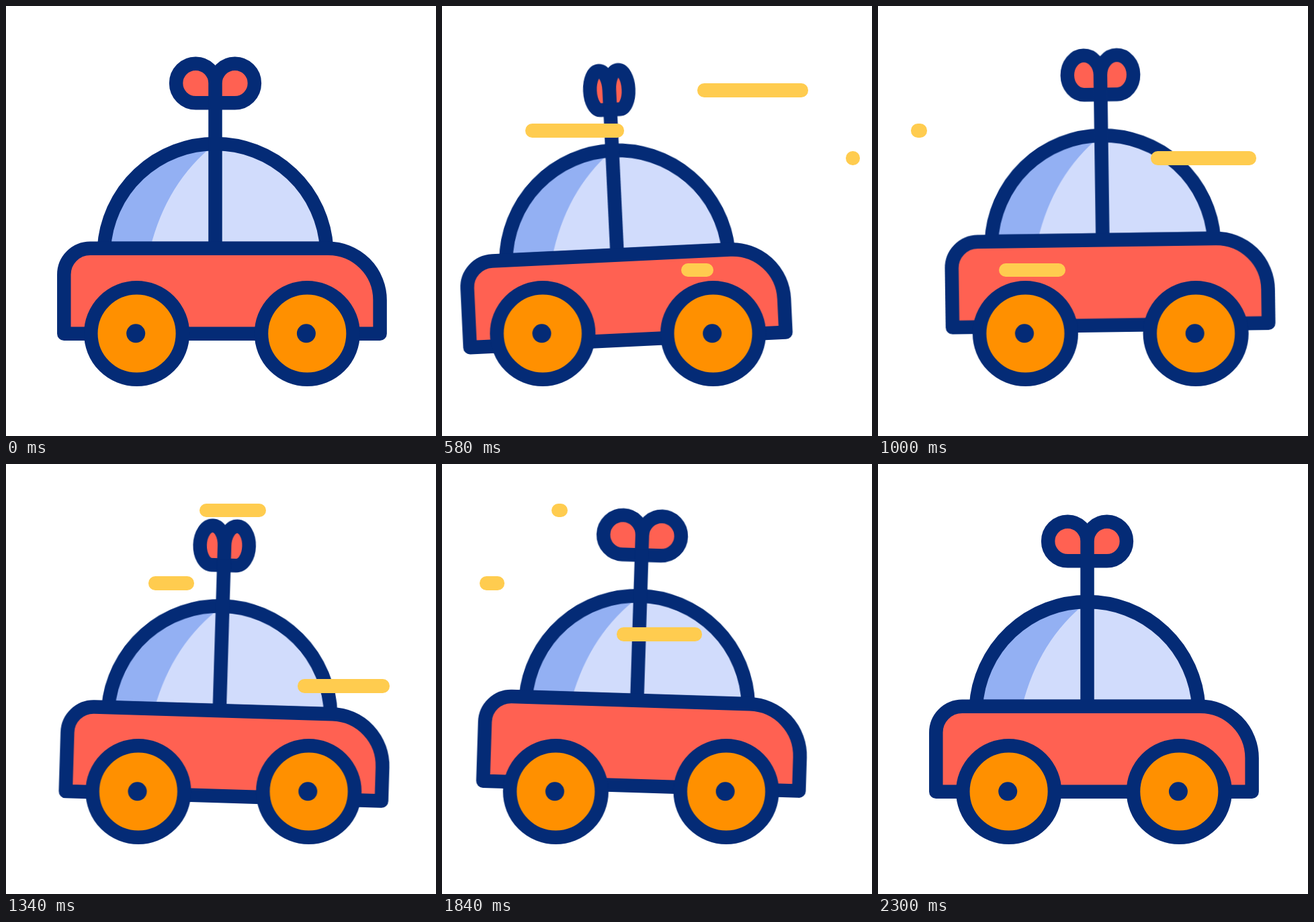
An HTML page for the animation above (2400 ms loop, 640 px wide and 640 px high).

```html
<!DOCTYPE html>
<html lang="en">
<head>
<meta charset="utf-8">
<title>Wind-up car</title>
<style>
  @property --turn { syntax: "<angle>"; inherits: false; initial-value: 0deg; }

  :root { --loop: 2400ms; --swing: cubic-bezier(.37, 0, .63, 1); }
  html, body { margin: 0; width: 100%; height: 100%; overflow: hidden; background: #fff; }
  #stage { position: relative; width: 640px; height: 640px; overflow: hidden; }
  svg { display: block; }

  .ink { stroke: #042b76; stroke-width: 20.5; stroke-linejoin: round; }
  .red { fill: #ff6152; }
  .tire { fill: #ff9000; }
  .hub { fill: #042b76; }

  .car, .body { animation: var(--loop) var(--swing) infinite; }
  .car { animation-name: drive; }
  .body { animation-name: bob, tilt; transform-origin: 321.5px 488px; }
  .key {
    vector-effect: non-scaling-stroke;
    transform-origin: 311.5px 115px;
    transform: scaleX(cos(var(--turn)));
    animation: wind var(--loop) infinite;
  }

  @keyframes drive {
    0%, 90%, 100% { transform: translateX(0); }
    23.33% { transform: translateX(-45px); }
    45.83% { transform: translateX(30.7px); }
    68.33% { transform: translateX(-37.5px); }
  }
  @keyframes bob {
    0%, 95.83%, 100% { translate: 0 0; }
    25% { translate: 0 9.2px; }
    42% { translate: 0 -12.6px; }
    58.75% { translate: 0 8px; }
    75% { translate: 0 -8.7px; }
  }
  @keyframes tilt {
    0%, 90%, 100% { rotate: 0deg; }
    23.33% { rotate: -2.75deg; }
    68.33% { rotate: 2.7deg; }
  }
  /* three full turns, slowing slightly */
  @keyframes wind {
    0% { --turn: 0deg; animation-timing-function: cubic-bezier(.333, .372, .667, .724); }
    95.83%, 100% { --turn: 1080deg; }
  }

  /* every streak runs the same dash to the left; the tail follows the head */
  .streak {
    --cap: 10.25px;
    --reach: 204px;
    --left: calc(var(--x) * 1px - var(--cap));
    --right: calc(640px - var(--x) * 1px - var(--cap));
    position: absolute;
    top: calc(var(--y) * 1px - var(--cap));
    height: calc(2 * var(--cap));
    border-radius: var(--cap);
    background: #ffcc4f;
    visibility: hidden;
    animation: var(--loop) var(--swing) calc(var(--start) * 1ms) infinite;
    animation-name: head, tail, show;
  }
  @keyframes head {
    0% { left: var(--left); }
    20.83%, 100% { left: calc(var(--left) - var(--reach)); }
  }
  @keyframes tail {
    0%, 10.62% { right: var(--right); }
    31.45%, 100% { right: calc(var(--right) + var(--reach)); }
  }
  @keyframes show {
    0%, 31.45% { visibility: visible; }
    31.46%, 100% { visibility: hidden; }
  }
</style>
</head>
<body>
<div id="stage">
  <svg width="640" height="640" viewBox="0 0 640 640">
    <defs>
      <g id="wheel">
        <circle class="ink tire" r="68.3"/>
        <circle class="hub" cx="-1.4" cy="-.2" r="14"/>
      </g>
    </defs>
    <g class="car">
      <g class="body">
        <path fill="#d1dcfc" d="M145.8 361A166 166 0 0 1 477.2 361z"/>
        <path fill="#93b0f3" d="M145.8 361A166 166 0 0 1 311.5 205Q239 262 214.5 361z"/>
        <path class="ink" fill="none" d="M145.8 361A166 166 0 0 1 477.2 361z"/>
        <path class="ink red key" d="M311.5 144V115a29.2 29.2 0 1 0-29.2 29.2H340.7a29.2 29.2 0 1 0-29.2-29.2z"/>
        <path class="ink" d="M311.5 136V361"/>
        <path class="ink red" d="M86.3 487.7V400a39 39 0 0 1 39-39.2H479.6a77 77 0 0 1 77 77V487.7z"/>
      </g>
      <use href="#wheel" x="194.6" y="487.5"/>
      <use href="#wheel" x="448.3" y="487.5"/>
    </g>
  </svg>
  <div class="streak" style="--x: 552; --y: 125.5; --start: 232"></div>
  <div class="streak" style="--x: 263; --y: 185.5; --start: 290"></div>
  <div class="streak" style="--x: 394; --y: 393; --start: 460"></div>
  <div class="streak" style="--x: 612; --y: 226.5; --start: 565"></div>
  <div class="streak" style="--x: 561; --y: 330.5; --start: 1068"></div>
  <div class="streak" style="--x: 377; --y: 69; --start: 1128"></div>
  <div class="streak" style="--x: 270; --y: 177.3; --start: 1180"></div>
  <div class="streak" style="--x: 474; --y: 253.5; --start: 1343"></div>
</div>
</body>
</html>
```
